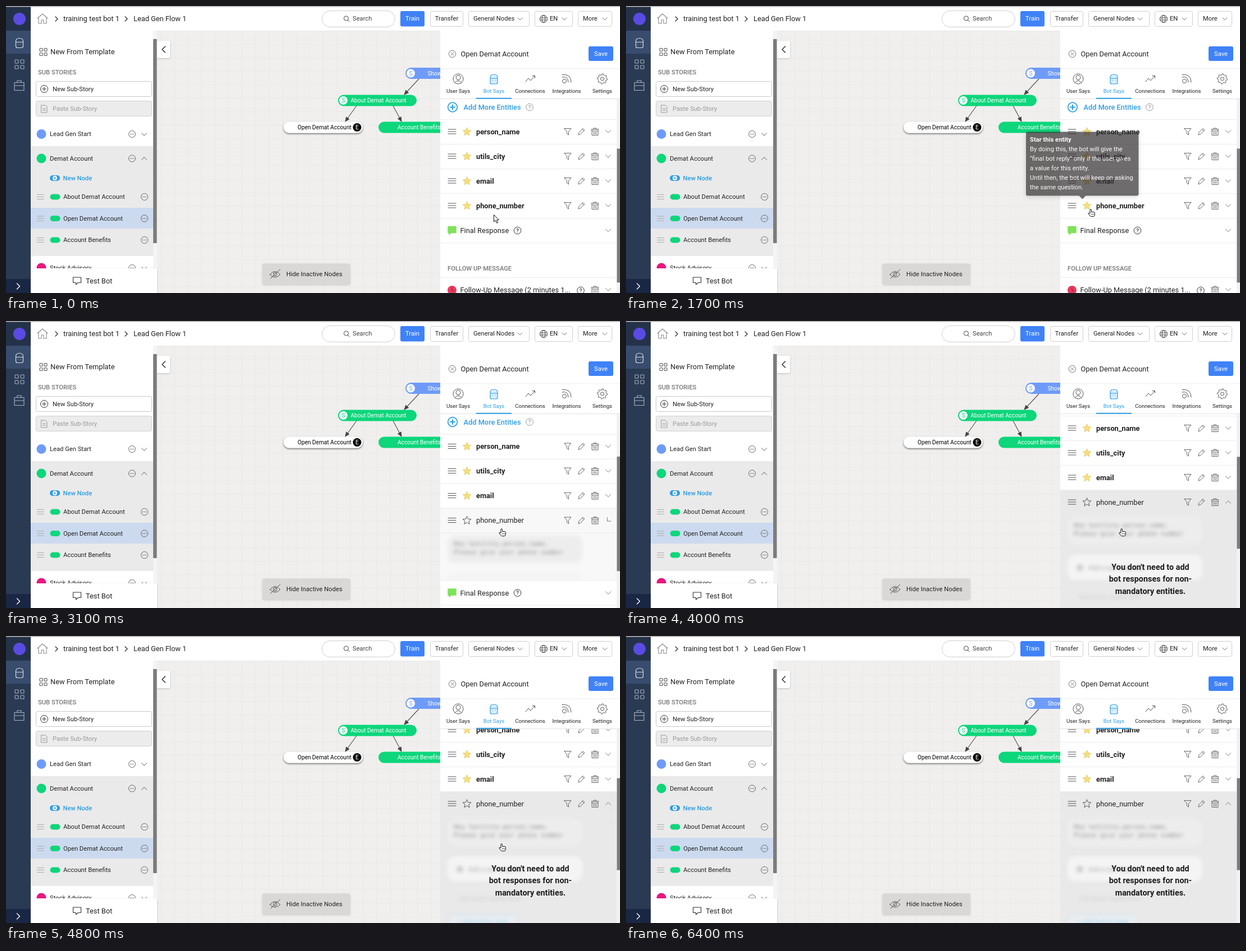
These frames come from a looping animation (1093x512 px, 6.6 s). An HTML page:

```html
<!DOCTYPE html>
<html lang="en">
<head>
<meta charset="utf-8">
<title>Bot builder</title>
<style>
html, body { margin: 0; width: 100%; height: 100%; overflow: hidden; background: #fff; }
svg { display: block; width: 1093px; height: 512px; font-family: Roboto, "Open Sans", sans-serif; }
text { white-space: pre; }
.l { fill: none; stroke-linecap: round; stroke-linejoin: round; }
.blur { filter: blur(3px); }
.mono { font-family: "DejaVu Sans Mono", "Noto Sans Mono", monospace; }
</style>
</head>
<body>
<svg id="stage" viewBox="0 0 1093 512"></svg>
<script>
const INK = '#222', GREY = '#777', BLUE = '#3f82f7', SKY = '#2e9de4', GREEN = '#0dd67b';

// Drawing helpers; text is placed by its vertical centre.
const text = (x, y, s, size = 11.2, fill = INK, weight = 400, anchor = 'start') =>
  `<text x="${x}" y="${(y + size * 0.355).toFixed(2)}" font-size="${size}" fill="${fill}" font-weight="${weight}" text-anchor="${anchor}">${s}</text>`;
const rect = (x, y, w, h, fill, r = 0, extra = '') =>
  `<rect x="${x}" y="${y}" width="${w}" height="${h}" rx="${r}" fill="${fill}" ${extra}/>`;
const box = (x, y, w, h, r, stroke = '#cfcfcf', fill = '#fff') =>
  rect(x + .5, y + .5, w - 1, h - 1, fill, r, `stroke="${stroke}"`);
const disc = (x, y, r, fill) => `<circle cx="${x}" cy="${y}" r="${r}" fill="${fill}"/>`;
const ring = (x, y, r, stroke = GREY, w = 1) =>
  `<circle cx="${x}" cy="${y}" r="${r}" fill="none" stroke="${stroke}" stroke-width="${w}"/>`;
const line = (d, stroke = GREY, w = 1, fill = 'none') =>
  `<path d="${d}" class="l" style="fill:${fill}" stroke="${stroke}" stroke-width="${w}"/>`;
const at = (x, y, s) => `<g transform="translate(${x} ${y})">${s}</g>`;
const shadow = (s, id = 'soft') => `<g filter="url(#${id})">${s}</g>`;

const down = (x, y, r = 4.5, c = GREY) => line(`M${x - r} ${y - r / 2}l${r} ${r}l${r} ${-r}`, c);
const up = (x, y, r = 4.5, c = GREY) => line(`M${x - r} ${y + r / 2}l${r} ${-r}l${r} ${r}`, c);
const right = (x, y, r, c, w) => line(`M${x - r / 2} ${y - r}l${r} ${r}l${-r} ${r}`, c, w);
const burger = (x, y, w, c) => [-4, 0, 4].map(d => line(`M${x} ${y + d}h${w}`, c)).join('');
const squares = (x, y, s, gap, c) => [0, 1, 2, 3].map(i =>
  rect(x + (i % 2) * gap, y + (i >> 1) * gap, s, s, 'none', 1, `stroke="${c}" stroke-width="1.1"`)).join('');
const more = (x, y) => ring(x, y, 6, '#666') + [-2.7, 0, 2.7].map(d => disc(x + d, y, .8, '#555')).join('');
const help = (x, y, c) => ring(x, y, 6.3, c) + text(x, y, '?', 9.6, c, 500, 'middle');

// Closed outline alternating between radii, starting at the top.
const spiky = radii => radii.map((r, i) => {
  const a = i * 2 * Math.PI / radii.length;
  return (i ? 'L' : 'M') + (r * Math.sin(a)).toFixed(2) + ' ' + (-r * Math.cos(a)).toFixed(2);
}).join('') + 'z';
const starPath = spiky(Array.from({ length: 10 }, (_, i) => i % 2 ? 3.5 : 7.8));
const gearPath = spiky(Array.from({ length: 32 }, (_, i) => i % 4 < 2 ? 9 : 7));
const STAR_ON = ['#f7df74', '#e3cd7c'], STAR_OFF = ['none', '#555'];
const star = id => `<path ${id} d="${starPath}" stroke-linejoin="round" fill="${STAR_ON[0]}" stroke="${STAR_ON[1]}"/>`;

const robot = (c, fill = 'none') =>
  line('M-6.5-3q0-5.5 6.500-5.500t6.500 5.500v8.500q0 3-3 3h-7q-3 0-3-3zM-6.500-1.500h13M-2.500 2h0M2.500 2h0', c, 1.2, fill);

function nav() {
  return rect(0, 1, 44, 511, '#2a3a53') + rect(0, 1, 44, 43, '#243249') + rect(0, 44, 44, 41, '#384d6d')
    + disc(24, 23, 11, '#5a4be3')
    + at(24, 66, robot('#d5dce6')) + squares(16, 96, 6, 10, '#a9b4c4')
    + line('M15 136.5h17v14h-17zM20 136v-3h7v3M15 142h17', '#a9b4c4', 1.1)
    + rect(0, 487, 44, 25, '#1a2744') + right(22, 500, 5, '#fff', 1.4);
}

function topBar() {
  return rect(44, 0, 1049, 44, '#fff')
    + line('M56 22l9-8l9 8M58 21v10h5v-6h4v6h5v-10', '#888', 1.1)
    + right(90, 23, 4, '#333', 1.4) + text(102, 22.5, 'training test bot 1', 12.8)
    + right(214, 23, 4, '#333', 1.4) + text(227, 22.5, 'Lead Gen Flow 1', 12.8)
    + box(562, 8, 131, 30, 14.5) + ring(605.5, 22, 4, '#444') + line('M608.5 25l3 3', '#444') + text(617, 22.5, 'Search', 11.2, '#444')
    + rect(702, 9, 43, 27.5, BLUE, 3) + text(723.5, 22.5, 'Train', 11.2, '#fff', 400, 'middle')
    + box(755, 9, 59, 28, 3) + text(784.5, 22.5, 'Transfer', 11.2, INK, 400, 'middle')
    + box(823, 9, 109, 28, 3) + text(832, 22.5, 'General Nodes') + down(915, 23, 4)
    + box(941, 9, 68, 28, 3) + ring(957, 23, 6.5, '#444')
    + `<ellipse cx="957" cy="23" rx="2.8" ry="6.5" fill="none" stroke="#444"/>` + line('M951 21h12M951 25h12', '#444', .9)
    + text(968, 22.5, 'EN') + down(994, 23, 4)
    + box(1018, 9, 61, 28, 3) + text(1027, 22.5, 'More') + down(1066, 23, 4)
    + rect(0, 0, 1093, 1.6, '#b4b4b4');
}

const node = (x, y, w, fill, label, lx, color = '#fff') =>
  rect(x, y - 10, w, 20, fill, 10) + text(lx, y, label, 10.15, color);
const badge = (x, y, c, letter, ink) => disc(x, y, 7.5, c) + text(x, y, letter, 10.5, ink, 400, 'middle');
const edge = (x1, y1, x2, y2) =>
  `<line x1="${x1}" y1="${y1}" x2="${x2}" y2="${y2}" stroke="#555" stroke-width="1.2" marker-end="url(#tip)"/>`;

function canvas() {
  return rect(269, 44, 504, 468, '#f0efee') + rect(269, 44, 504, 468, 'url(#grid)')
    + edge(735, 130, 709, 158) + edge(624, 178, 604, 206) + edge(689, 178, 704, 206)
    + node(711, 120, 140, '#6f9bf8', 'Show', 750.5) + badge(720.5, 120, '#fff', 'S', '#6f9bf8')
    + node(591, 168.5, 140, GREEN, 'About Demat Account', 613.5) + badge(600.5, 168.5, '#fff', 'S', GREEN)
    + shadow(rect(494, 206.5, 141, 20, '#fff', 10), 'drop') + text(519, 216.5, 'Open Demat Account', 10.15, '#000')
    + badge(625, 216.5, '#000', 'E', '#fff')
    + node(663, 216.5, 140, GREEN, 'Account Benefits', 697)
    + shadow(rect(269, 62, 23, 31, '#fff', 3)) + line('M283.5 72l-5.5 5.5l5.5 5.5', '#222', 1.3)
    + shadow(rect(456.5, 459.5, 156, 37, '#d9d8d7', 3))
    + line('M470 479q9-11 18 0q-9 10-18 0zM471 486l17-16', '#555') + ring(479, 478.5, 3, '#555') + text(499, 478, 'Hide Inactive Nodes');
}

function sidebar() {
  const sub = (y, label) => burger(55.5, y, 12, '#aaa') + rect(78.5, y - 5, 18, 10, GREEN, 5)
    + text(102, y, label) + more(246.5, y);
  return rect(44, 44, 225, 468, '#fff')
    + squares(60, 75.5, 5, 8, '#555') + text(79, 81.5, 'New From Template', 12.8)
    + text(57, 118.5, 'SUB STORIES', 11.2, GREY, 500)
    + box(53, 134, 207, 28, 3, '#c8c8c8') + ring(68, 148, 6.5, '#333') + line('M64.5 148h7M68 144.5v7', '#333') + text(83, 148, 'New Sub-Story')
    + box(53, 169, 207, 28, 3, '#d0d0d0', '#ececec') + line('M63 177h7l3 3v10h-10zM65.5 183h5M65.5 186h5', '#999') + text(83, 183.5, 'Paste Sub-Story', 11.2, '#999')
    + disc(63, 228.5, 8.5, '#6f9bf8') + text(78, 228.5, 'Lead Gen Start') + more(224.5, 228.5) + down(246, 229, 4.5, '#555')
    + rect(44, 250, 218, 196, '#eaeaea')
    + disc(63, 272, 8.5, GREEN) + text(78, 272, 'Demat Account') + more(224.5, 272) + up(246, 272, 4.5, '#555')
    + rect(78, 302, 18, 10, SKY, 5) + disc(87, 307, 4, '#fff') + line('M85 307h4M87 305v4', SKY, 1.2) + text(101.5, 307, 'New Node', 11.2, SKY, 500)
    + rect(44, 360, 218, 37, '#ccdaef')
    + sub(340.5, 'About Demat Account') + sub(379, 'Open Demat Account') + sub(417.5, 'Account Benefits')
    + disc(63, 467, 8.5, '#ea1780') + text(78, 467.5, 'Stock Advisory') + more(224.5, 467.5) + down(246, 468, 4.5, '#555')
    + rect(262, 44, 7, 424, '#f4f4f4') + rect(262, 59, 6.5, 364, '#7c7c7c')
    + shadow(rect(44, 468, 225, 46, '#fff'))
    + line('M119.5 484h14v9.5h-5l-4 3.5v-3.5h-5z', '#333', 1.1) + text(142, 490, 'Test Bot', 12.8);
}

function panelHead() {
  const tab = (x, label, c = INK) => text(x, 151.5, label, 9.6, c, 400, 'middle');
  return rect(773, 44, 320, 122, '#fff')
    + ring(794.5, 85.5, 6.2, GREY) + line('M792 83l5 5M797 83l-5 5', GREY) + text(809.5, 85.5, 'Open Demat Account', 12.8)
    + rect(1037, 72, 44, 26, BLUE, 3) + text(1059, 85, 'Save', 11.2, '#fff', 400, 'middle')
    + rect(773, 111.5, 320, 1, '#eee') + rect(773, 165, 320, 1, '#e2e2e2')
    + ring(805, 130, 9, '#555') + ring(805, 127.5, 4, '#555') + line('M799 137q6-8 12 0', '#555') + tab(805, 'User Says')
    + at(868.5, 130.5, robot(SKY, '#dceefb')) + tab(868.5, 'Bot Says', SKY)
    + line('M925 135l5-6l4 4l7-8M937 124.5h4.5v4', '#555') + tab(933, 'Connections')
    + ring(994, 134, 3.5, '#555') + line('M990 127q10-3 11 9M990 122.500q16-2 16 13.500', '#555') + tab(998, 'Integrations')
    + at(1061.5, 130, line(gearPath, '#555') + ring(0, 0, 3, '#555')) + tab(1061.5, 'Settings')
    + rect(837, 163.8, 63, 2, SKY);
}

const bin = (x, y) => at(x, y, line('M-6.5-4h13M-2.500-4v-2h5v2M-5.500-4v10.500h11v-10.500M-5.500-1h11M-2.500 1v3.500M0 1v3.500M2.500 1v3.500', '#666'));
const tools = y => line(`M994 ${y - 5.5}h12l-4.5 5.5v6l-3-2v-4z`, '#666')
  + line(`M1019 ${y + 5.5}l1-4l7-7l3 3l-7 7zM1025.5 ${y - 4}l3 3`, '#666') + bin(1048.5, y);

function rows() {
  const row = (name, i) => {
    const y = 224 + i * 44, last = i === 3;
    return rect(773, y + 22, 314, 1, '#ececec') + burger(787, y, 14, '#555')
      + at(820.5, y + .5, star(last ? 'id="star"' : '')) + tools(y)
      + `<g ${last ? 'id="name"' : ''}>${text(837, y, name, 12.8, INK, 700)}</g>`
      + at(1072, y, `<g ${last ? 'id="chev"' : ''}>${down(0, 0)}</g>`);
  };
  return ring(795, 180.5, 8.3, SKY, 1.7) + line('M791 180.5h8M795 176.5v8', SKY, 2)
    + text(814.5, 180.5, 'Add More Entities', 12.8, SKY, 500) + help(932, 180.5, '#999')
    + rect(773, 202, 314, 1, '#ececec')
    + `<g id="shade">${rect(773, 334, 314, 44, '#e9e9e9')}</g>`
    + `<g clip-path="url(#fold)"><g id="fill">${rect(773, 378, 314, 229, '#e9e9e9')}</g>${body()}</g>`
    + ['person_name', 'utils_city', 'email', 'phone_number'].map(row).join('')
    + `<g id="after">` + rect(773, 378, 314, 134, '#fff') + rect(773, 378, 314, 1, '#ececec')
    + line('M787 393.5h14v11h-8l-4 3v-3h-2z', '#80e25c', 1.5, '#80e25c') + text(808.5, 400.5, 'Final Response', 12.8) + help(910.5, 400.5, '#333') + down(1072, 400.5)
    + rect(773, 422, 314, 1, '#ececec') + text(786, 468, 'FOLLOW UP MESSAGE', 11.2, GREY, 500) + rect(773, 484, 314, 1, '#ececec')
    + disc(794, 507, 8, '#ea3a5e') + line('M794 502v5l3 2', '#8c1d38', 1.1)
    + text(808.5, 506, 'Follow-Up Message (2 minutes 1...', 12.8) + help(1023, 507.5, '#333') + bin(1048.5, 506) + down(1072, 506) + `</g>`;
}

// Disabled reply editor, blurred behind its notice.
function body() {
  const lines = ["You don't need to add", 'bot responses for non-', 'mandatory entities.'];
  return `<g class="blur">` + rect(786, 383, 240, 49, '#ededed', 14)
    + `<g class="mono" opacity=".5">${text(797, 397.5, 'Hey %utility.person_name,') + text(797, 412.5, 'Please give your phone number')}</g>`
    + rect(786, 450, 240, 45, '#f4f4f4', 14)
    + `<g opacity=".3">${disc(808, 473, 6, '#777') + text(823, 473, 'Add a new response', 11.2, INK, 500)}</g>`
    + `<g opacity=".12">${text(806, 525, 'Add quick replies here')}</g>`
    + box(786, 554, 126, 24, 12, '#b9d9ee', '#eaeef1') + `<g opacity=".4">${text(849, 566, '+ add button node', 11.2, SKY, 400, 'middle')}</g></g>`
    + lines.map((s, i) => text(933.5, 471.5 + i * 21.6, s, 14.4, '#1c1c1c', 700, 'middle')).join('');
}

function tooltip() {
  const lines = ['Star this entity', 'By doing this, the bot will give the', '“final bot reply” only if the user gives',
    'a value for this entity.', 'Until then, the bot will keep on asking', 'the same question.'];
  return shadow(rect(720, 232.5, 200.5, 114, '#302e2d', 3), 'glow') + `<path d="M814 346h13l-6.5 6.500z" fill="#302e2d"/>`
    + lines.map((s, i) => text(727, 246.5 + i * 16.9, s, 11.2, '#fff', i ? 400 : 700)).join('');
}

const cursors = `<path id="arrow" d="M.5 .5v12.500l2.900-2.600l2.100 4.800l2.100-.9l-2-4.700h3.800z" fill="#fff" stroke="#111" stroke-linejoin="round"/>
<g id="hand"><path d="M4 8.200V1.800a1.200 1.200 0 0 1 2.400 0V5.500h4.400q1.600.1 1.600 1.800V10q0 3.600-2.400 3.600H6.200Q4.700 13.500 3.700 12L1.100 9Q.5 7.500 2 7.200z" fill="#fff" stroke="#111" stroke-linejoin="round"/><path d="M6.500 8.500v2M8.500 8.500v2M10.400 8.500v2" stroke="#111" stroke-width=".8"/></g>`;

document.getElementById('stage').innerHTML = `<defs>
<pattern id="grid" width="24" height="24" x="276" y="44" patternUnits="userSpaceOnUse"><path d="M0 .5H24M.5 0V24" stroke="#eae9e8"/></pattern>
<marker id="tip" markerUnits="userSpaceOnUse" markerWidth="9" markerHeight="8" refX="8" refY="4" orient="auto"><path d="M0 0L9 4L0 8z" fill="#444"/></marker>
<filter id="drop" x="-10%" y="-50%" width="120%" height="220%"><feDropShadow dx="0" dy="1.5" stdDeviation="1.5" flood-opacity=".6"/></filter>
<filter id="soft" x="-20%" y="-30%" width="140%" height="170%"><feDropShadow dx="0" dy="1" stdDeviation="1.5" flood-opacity=".22"/></filter>
<filter id="glow" x="-15%" y="-20%" width="130%" height="145%"><feDropShadow dx="0" dy="2" stdDeviation="5" flood-opacity=".2"/></filter>
<clipPath id="view"><rect x="773" y="166" width="314" height="346"/></clipPath>
<clipPath id="fold"><rect id="foldBox" x="773" y="378" width="314" height="0"/></clipPath>
</defs>` + canvas() + sidebar() + nav() + topBar()
  + rect(773, 166, 320, 346, '#fff') + `<g clip-path="url(#view)"><g id="list">${rows()}</g></g>`
  + rect(1087, 166, 6, 346, '#f1f1f1') + `<rect id="thumb" x="1087.5" width="5.5" fill="#7c7c7c"/>`
  + panelHead() + `<g id="tooltip">${tooltip()}</g>` + cursors;

const el = id => document.getElementById(id);
const move = (id, x, y) => el(id).setAttribute('transform', `translate(${x} ${y})`);

// Tracks of [time, ...values]; each value holds until the next time.
const pointer = [[0, 868, 372], [100, 866, 373], [700, 866, 372], [900, 862, 370], [1000, 850, 365], [1100, 833, 356],
  [1200, 815, 350], [1300, 814, 351], [1400, 818, 357], [1500, 822, 362], [2500, 846, 367], [2600, 877, 370],
  [5200, 818, 337], [5400, 790, 316], [5500, 759, 293], [5700, 500, 208], [5800, 280, 131], [6000, 160, 76], [6100, 60, 26], [6200, 13, 2], [6300, -50, -50]];
const tip = [[0, 0, 0], [1600, .3, 27], [1700, .7, 8], [1800, .95, 1], [1900, 1, 0], [2500, .5, 0], [2600, 0, 0]];
const unfold = [[0, 0], [3100, 85], [3200, 200], [3300, 225], [3400, 229]];
const scroll = [[0, 128], [3100, 128.5], [3900, 142], [4000, 161], [4100, 178], [4200, 190], [4500, 189], [4600, 187], [4700, 186], [4800, 185]];
const hold = (track, t) => track.findLast(k => k[0] <= t).slice(1);

function render(t) {
  const [x, y] = hold(pointer, t), [alpha, shift] = hold(tip, t);
  const [open] = hold(unfold, t), [top] = hold(scroll, t);
  const hand = t >= 100 && t < 5200, starred = t < 2200;

  move('arrow', x, y);
  move('hand', x, y);
  el('arrow').style.display = hand ? 'none' : '';
  el('hand').style.display = hand ? '' : 'none';

  move('tooltip', -shift, -shift);
  el('tooltip').style.opacity = alpha;

  const [fill, stroke] = starred ? STAR_ON : STAR_OFF;
  el('star').setAttribute('fill', fill);
  el('star').setAttribute('stroke', stroke);
  el('name').firstChild.setAttribute('font-weight', starred ? 700 : 400);

  const tint = open ? (open < 100 ? .3 : 1) : 0;
  el('shade').style.opacity = el('fill').style.opacity = tint;
  el('foldBox').setAttribute('height', open);
  el('chev').setAttribute('transform', `rotate(${open ? (open < 100 ? 45 : 180) : 0})`);
  move('after', 0, open);
  move('list', 0, 128 - top);

  const ratio = 346 / (501 + open);
  el('thumb').setAttribute('y', 166 + top * ratio);
  el('thumb').setAttribute('height', 346 * ratio);
}

const start = performance.now();
function tick() {
  render((performance.now() - start) % 6600);
  requestAnimationFrame(tick);
}
tick();
</script>
</body>
</html>
```
